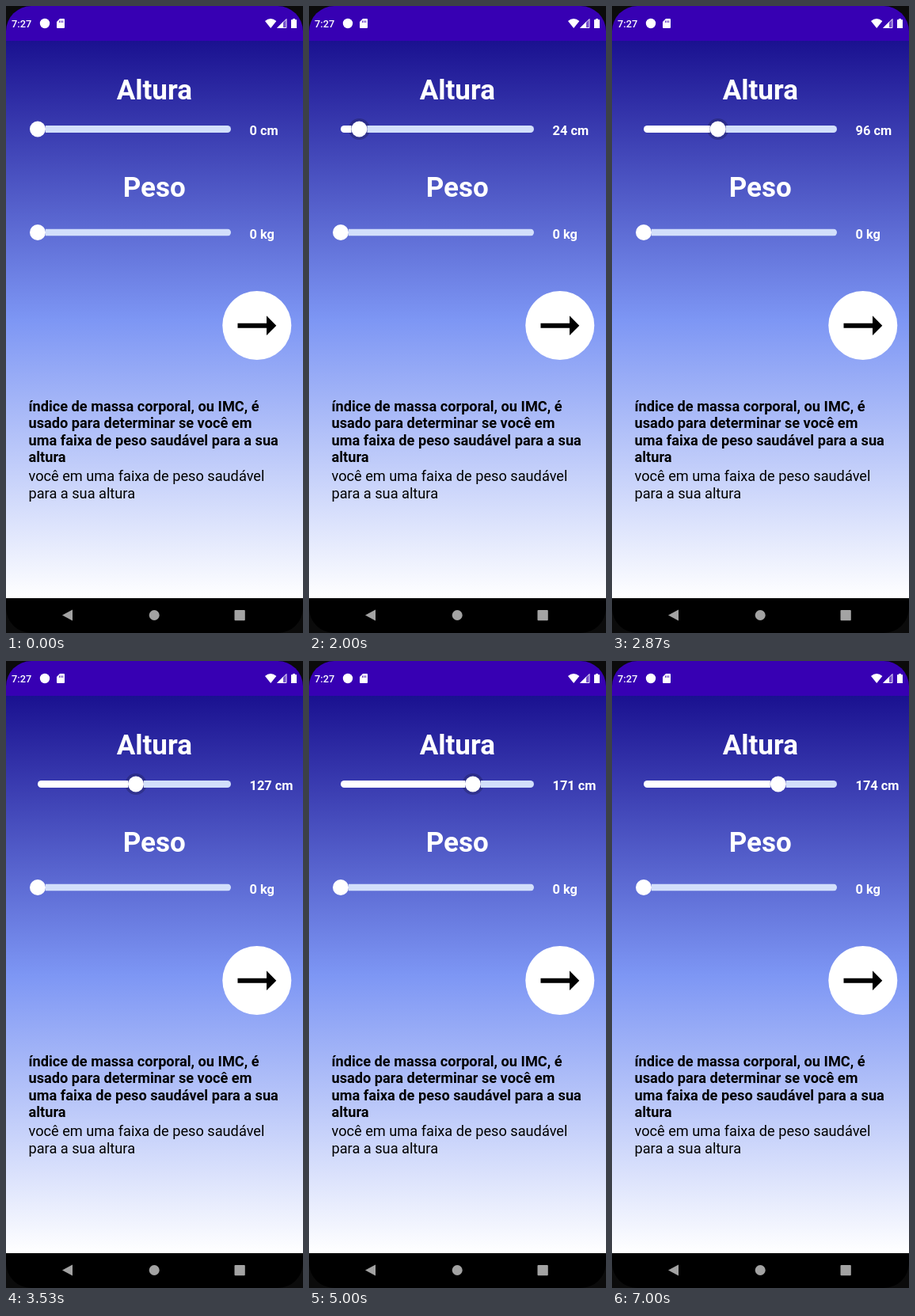
Write an HTML page that moves like this. It is 375 by 792 pixels and loops after 8000 ms.

```html
<!DOCTYPE html>
<html lang="pt">
<head>
<meta charset="utf-8">
<style>
  html, body { margin: 0; width: 100%; height: 100%; overflow: hidden; background: #0b0b0b; }
  svg { display: block; width: 375px; height: 792px; font-family: Roboto, sans-serif; }
  .title { font-size: 35px; font-weight: 700; fill: #fff; text-anchor: middle; }
  .value { font-size: 16.4px; font-weight: 700; fill: #fff; }
  .body { font-size: 18.2px; }
  .bold { font-weight: 700; }
</style>
</head>
<body>
<svg viewBox="0 0 375 792">
  <defs>
    <linearGradient id="sky" x1="0" y1="0" x2="0" y2="1">
      <stop offset="0" stop-color="#1a1190"/>
      <stop offset=".5" stop-color="#7d96f4"/>
      <stop offset="1" stop-color="#fff"/>
    </linearGradient>
    <clipPath id="screen"><rect width="375" height="792" rx="32"/></clipPath>
  </defs>
  <g clip-path="url(#screen)">
    <rect width="375" height="792"/>
    <rect width="375" height="44.5" fill="#3700b3"/>
    <rect y="44" width="375" height="704" fill="url(#sky)"/>
  </g>

  <!-- status bar -->
  <g fill="#fff">
    <text x="7" y="27" font-size="12.8" font-weight="500">7:27</text>
    <circle cx="49" cy="22" r="6.2"/>
    <path d="M68 16h5q1 0 1 1v10q0 1-1 1h-8q-1 0-1-1v-7z"/>
    <path d="M67.5 18.5v2.5M69.6 18.5v2.5M71.7 18.5v2.5" stroke="#3700b3" stroke-width=".9"/>
    <path d="M327 19q7-6 14.400 0L334.200 28z"/>
    <path d="M354 16.500V27.500H343z" fill-opacity=".3" stroke="#fff" stroke-width=".9"/>
    <path d="M350 20v8h-8z"/>
    <path d="M362 16h3v1.300h2v10.700h-7v-10.700h2z"/>
  </g>

  <text class="title" x="187.300" y="118">Altura</text>
  <text class="title" x="187.300" y="241">Peso</text>
  <g id="sliders"></g>

  <circle cx="316.800" cy="403.500" r="43.500" fill="#fff"/>
  <path d="M292.500 400.800H329V391.300L341.300 403.700 329 416V406.700H292.500z"/>

  <g class="body">
    <g class="bold">
      <text x="28.500" y="512">índice de massa corporal, ou IMC, é</text>
      <text x="28.500" y="533.300">usado para determinar se você em</text>
      <text x="28.500" y="554.600">uma faixa de peso saudável para a sua</text>
      <text x="28.500" y="576">altura</text>
    </g>
    <text x="28.500" y="600.300">você em uma faixa de peso saudável</text>
    <text x="28.500" y="621.600">para a sua altura</text>
  </g>

  <!-- navigation bar -->
  <g fill="#a3a3a3">
    <path d="M71 769.500L84 762.500V776.500z"/>
    <circle cx="187.200" cy="769.500" r="6.500"/>
    <rect x="288.500" y="763" width="13.300" height="13.300" rx="1"/>
  </g>
</svg>
<script>
  const LOOP = 8000, FPS = 15, LEFT = 40, RIGHT = 284, MAX = 250, THUMB = 10;

  // [ms, value] points of the dragged height slider
  const drag = [
    [0, 0], [1400, 0], [1700, 9], [2000, 24], [2267, 42], [2867, 96], [3133, 112],
    [3533, 127], [4000, 142], [4333, 150], [4867, 165], [5000, 171], [5133, 171],
    [5533, 183], [5600, 183], [5733, 182], [5800, 182], [6000, 173], [6867, 173],
    [6933, 174], [LOOP, 174]
  ];
  const press = [[0, 0], [1000, 0], [1200, 1], [6867, 1], [7000, 0], [LOOP, 0]];

  function sample(points, t) {
    const i = Math.max(1, points.findIndex(p => p[0] >= t));
    const [t0, a] = points[i - 1], [t1, b] = points[i];
    return a + (b - a) * (t - t0) / (t1 - t0);
  }

  function makeSlider(y, unit) {
    const group = document.createElementNS('http://www.w3.org/2000/svg', 'g');
    const track = fill => `<rect x="${LEFT}" y="${y - 4.5}" width="${RIGHT - LEFT}" height="9" rx="4.5" fill="${fill}"/>`;
    group.innerHTML = `<circle cy="${y}" r="13.5" fill="#000"/>${track('#fff')}${track('#d2dffb')}
      <circle cy="${y}" r="${THUMB}" fill="#fff"/><text class="value" x="307.5" y="${y + 7.5}"></text>`;
    document.getElementById('sliders').append(group);
    const [halo, done, rest, thumb, label] = group.children;

    return (value, pressed) => {
      const x = LEFT + (RIGHT - LEFT) * value / MAX;
      halo.setAttribute('cx', x);
      thumb.setAttribute('cx', x);
      halo.setAttribute('opacity', 0.2 * pressed);
      // the track is split around the thumb
      done.style.clipPath = `inset(0 ${RIGHT - x + THUMB}px 0 0)`;
      rest.style.clipPath = `inset(0 0 0 ${x + THUMB - LEFT}px)`;
      label.textContent = `${value} ${unit}`;
    };
  }

  const setHeight = makeSlider(155.5, 'cm');
  const setWeight = makeSlider(286, 'kg');
  setWeight(0, 0);

  function draw(now) {
    const step = Math.floor((now % LOOP + 4) * FPS / 1000);
    const t = Math.min(LOOP, step * 1000 / FPS);
    setHeight(Math.round(sample(drag, t)), sample(press, t));
    requestAnimationFrame(() => draw(performance.now()));
  }
  draw(performance.now());
</script>
</body>
</html>
```
